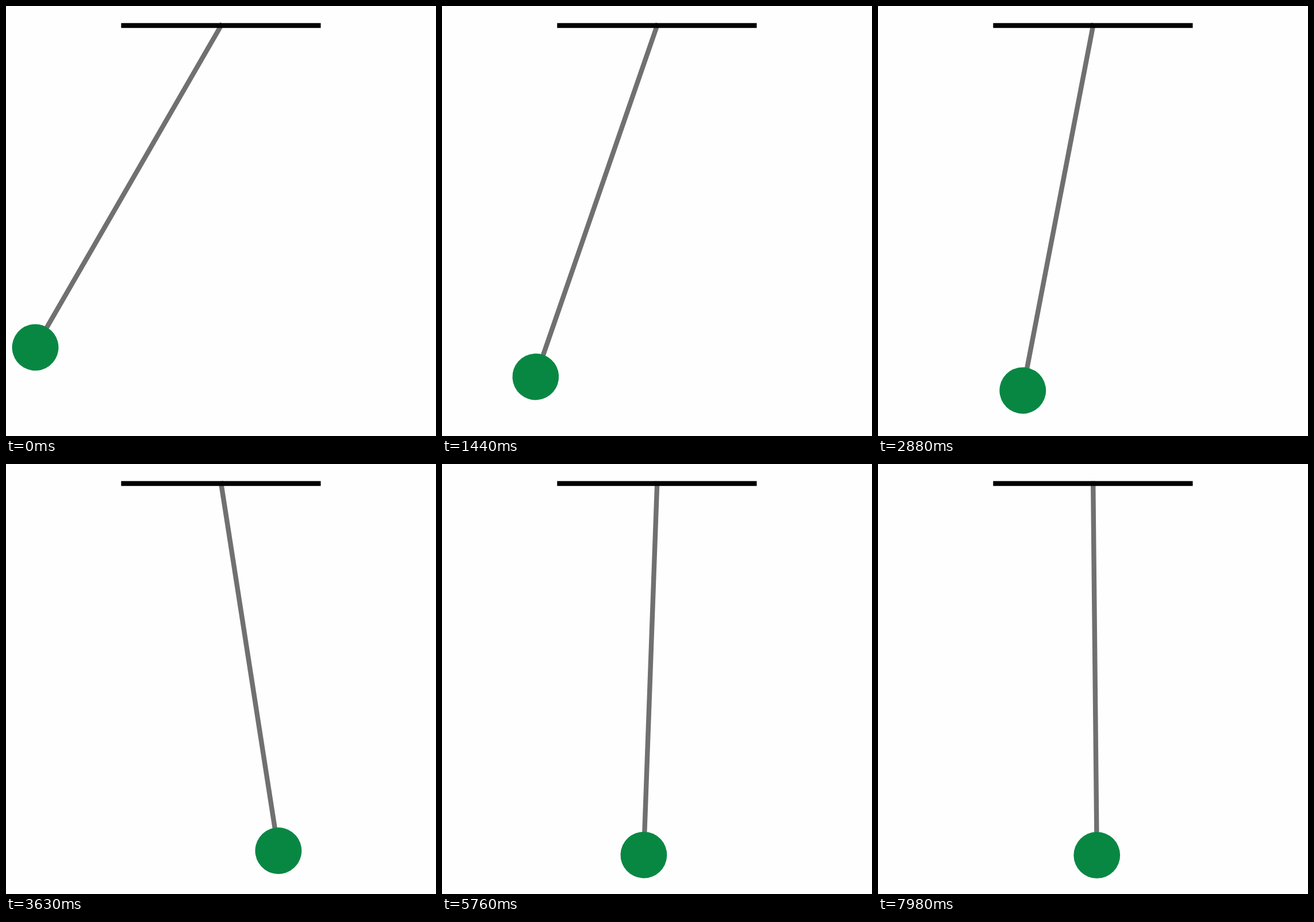
Recreate the animation shown at these times as an HTML page. Size 748 px wide and 748 px high, loop 8000 ms.

```html
<!DOCTYPE html>
<html lang="en">
<head>
<meta charset="utf-8">
<title>Damped pendulum</title>
<style>
html, body { margin: 0; width: 100%; height: 100%; overflow: hidden; background: #fefefe; }
svg { display: block; width: 100%; height: 100%; }
</style>
</head>
<body>
<svg viewBox="0 0 748 748">
  <g id="arm">
    <line x1="374.2" y1="34" x2="374.2" y2="670" stroke="#707070" stroke-width="8.4" stroke-linecap="square"/>
    <circle cx="374.2" cy="680.5" r="40.4" fill="#088743"/>
  </g>
  <rect x="200.3" y="29.7" width="347.2" height="8.5" fill="#000"/>
</svg>
<script>
const LOOP = 8000, STEP = 30;
const STIFFNESS = 9.81 / 0.56, DAMPING = 0.51;
const arm = document.getElementById('arm');

const accel = (a, v) => -STIFFNESS * Math.sin(a) - DAMPING * v;

// One Runge-Kutta step of the damped pendulum
function advance([a, v], h) {
  const k1 = accel(a, v);
  const v2 = v + k1 * h / 2, k2 = accel(a + v * h / 2, v2);
  const v3 = v + k2 * h / 2, k3 = accel(a + v2 * h / 2, v3);
  const v4 = v + k3 * h, k4 = accel(a + v3 * h, v4);
  return [
    a + h * (v + 2 * v2 + 2 * v3 + v4) / 6,
    v + h * (k1 + 2 * k2 + 2 * k3 + k4) / 6
  ];
}

// Released at rest, 30 degrees to the left
const angles = [];
let state = [Math.PI / 6, 0];
for (let t = 0; t < LOOP; t += STEP) {
  angles.push(state[0] * 180 / Math.PI);
  for (let i = 0; i < 3; i++) state = advance(state, STEP / 3000);
}

function draw(ms) {
  const angle = angles[Math.floor(ms % LOOP / STEP)];
  arm.setAttribute('transform', `rotate(${angle.toFixed(4)} 374.2 34)`);
}

const start = performance.now();
function tick() {
  draw(performance.now() - start);
  requestAnimationFrame(tick);
}
tick();
</script>
</body>
</html>
```
